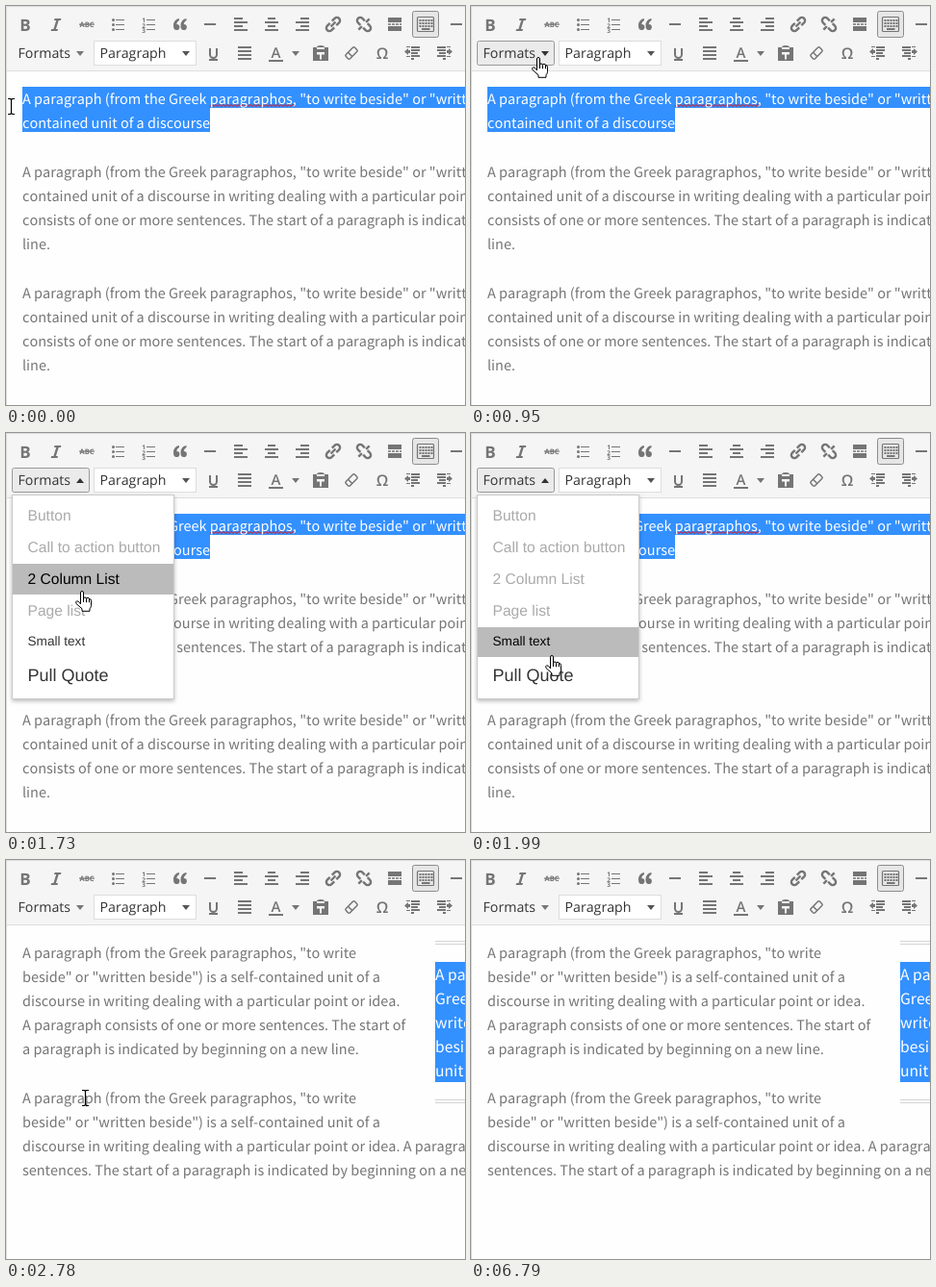
Recreate the animation shown at these times as an HTML page. Size 477 px wide and 415 px high, loop 7350 ms.

```html
<!DOCTYPE html>
<html lang="en">
<head>
<meta charset="utf-8">
<title>Editor formats menu</title>
<style>
html, body { margin: 0; width: 100%; height: 100%; overflow: hidden; background: #fefefe; }
svg { display: block; width: 477px; height: 415px; }
text { white-space: pre; text-rendering: geometricPrecision; font-kerning: none; }
.page { font: 14.47px "Noto Sans CJK JP", "Noto Sans CJK SC", "Noto Sans CJK", sans-serif; fill: #757575; font-kerning: none; }
.page .sel { fill: #fff; }
.quote { font-size: 15.7px; }
.ui { font: 14.2px "Open Sans", sans-serif; fill: #333; font-kerning: none; }
.menu { font-family: "Liberation Sans", Arial, sans-serif; }
.panel { filter: drop-shadow(0 2px 2px #0004); }
.icons { fill: #757575; font-family: "Open Sans", sans-serif; font-weight: 700; text-anchor: middle; }
.line { fill: none; stroke: #757575; stroke-width: 2; }
</style>
</head>
<body>
<svg viewBox="0 0 477 415">
  <rect width="477" height="415" fill="#fefefe"/>

  <g class="page" id="before">
    <path d="M17 84H477V106H212V131H17z" fill="#3390ff"/>
    <path id="squiggle" fill="none" stroke="#f00"/>
  </g>
  <g class="page" id="after">
    <path d="M446 84.5h31M446 87.5h31M446 249.5h31M446 252.5h31" stroke="#d4d4d4"/>
    <rect x="446" y="106" width="31" height="125" fill="#3390ff"/>
  </g>

  <rect width="477" height="67" fill="#f5f5f5"/>
  <path d="M0 .5H477M0 67.5H477M.5 0V415" stroke="#dedede"/>

  <g class="icons">
    <text x="20" y="25.500" font-size="17">B</text>
    <path d="M56.800 15h-2.100l-2.800 9h2.100l-.6 2h-6.800l.6-2h2.200l2.800-9h-2.200l.6-2h6.800z"/>
    <text x="84" y="22" font-size="7.5">ABC</text>
    <path d="M76 18.500h16v1.200H76z"/>
    <circle cx="111.500" cy="14.500" r="1.500"/>
    <circle cx="111.500" cy="19.500" r="1.500"/>
    <circle cx="111.500" cy="24.500" r="1.500"/>
    <text x="143" y="17" font-size="6.500">1</text>
    <text x="143" y="22.500" font-size="6.500">2</text>
    <text x="143" y="28" font-size="6.500">3</text>
    <path id="mark" d="M180 13q-6 1-6 7.500q0 4.500 3.200 4.500t3.200-3.100t-3.200-3q.5-2.900 2.800-4z"/>
    <use href="#mark" x="7.500"/>
    <path d="M397 12h14v5h-14zm0 9h14v5h-14z"/>
    <rect x="422.500" y="5.500" width="27" height="27" rx="2" fill="#e6e6e6" stroke="#8c8c8c"/>
    <text x="280.500" y="54" font-size="15" font-weight="600">A</text>
    <path d="M273 56h15v2h-15zM297 47h8l-4 5z"/>
    <path d="M319 43h4q0-2 4-2t4 2h4v14h-16z"/>
    <path d="M323 43h8v2h-8zM323 48h8v2.500h-3v5h-2v-5h-3z" fill="#f5f5f5"/>
    <text x="391" y="55" font-size="16" font-weight="600">Ω</text>
    <path id="outdent" d="M420 43v-1h-4v1zM430 44v-2h-9v2zM420 46h-2v-2l-4 3.500 4 3.500v-2h2zM430 47v-2h-9v2zM428 50v-2h-7v2zM430 53v-2h-9v2zM420 53v-1h-4v1zM424 56v-2h-3v2z"/>
    <use href="#outdent" transform="matrix(-1 0 0 1 878 0)"/>
  </g>
  <g class="line">
    <path d="M114 14.500h9m-9 5h9m-9 5h9M146 14.500h9m-9 5h9m-9 5h9" stroke-width="1.200"/>
    <path d="M206 19h12M462 19h12"/>
    <path d="M237 13h9m-9 4h14m-14 4h9m-9 4h14M272 13h8m-11 4h14m-11 4h8m-11 4h14M306 13h9m-14 4h14m-9 4h9m-14 4h14"/>
    <path d="M241 43h14m-14 4h14m-14 4h14m-14 4h14"/>
    <path d="M212 44v6.500a3.500 3.500 0 0 0 7 0V44M211 56h9"/>
    <path d="M397 19h14" stroke-dasharray="3 1" stroke-width="1.500"/>
    <rect x="427.500" y="11.500" width="17" height="15" rx="1" stroke-width="1.200"/>
    <path d="M429.500 15h14m-14 3h14m-14 3h14" stroke-dasharray="2 1"/>
    <path d="M432 24h8.500"/>
    <g transform="rotate(-45 340 19)" stroke-width="2.400">
      <path d="M338.500 15.800h-4a3.200 3.200 0 0 0 0 6.400h4M341.500 15.800h4a3.200 3.200 0 0 1 0 6.400h-4M336.500 19h7"/>
    </g>
    <g transform="rotate(45 372 19)" stroke-width="2.400">
      <path d="M370 15.800h-3.500a3.200 3.200 0 0 0 0 6.400h3.500M374 15.800h3.500a3.200 3.200 0 0 1 0 6.400h-3.500M372 11v5m0 6v5"/>
    </g>
    <g transform="rotate(-45 359 49)" stroke-width="1.500">
      <rect x="352.500" y="46" width="13" height="6" rx="1.500"/>
      <path d="M357 46v6"/>
    </g>
  </g>

  <g class="ui">
    <rect id="button" x="6.500" y="36.500" width="80" height="25" rx="2" stroke="#999"/>
    <text x="12.500" y="54">Formats</text>
    <path id="caret"/>
    <rect id="list" x="91.500" y="36.500" width="106" height="25" fill="#fff"/>
    <text x="97.500" y="54">Paragraph</text>
    <path d="M183 47h8l-4 5z" fill="#555"/>
  </g>

  <g class="menu" id="menu">
    <rect class="panel" x="6.500" y="64.500" width="168" height="212" fill="#fff" stroke="#ccc"/>
  </g>

  <g id="pointer">
    <path id="beam" d="M-3-7.500h2.500l1 1 1-1h2.500M.5-6.500V7.500M-3 8.500h2.500l1-1 1 1h2.500" fill="none" stroke="#000" stroke-width="1.200"/>
    <path id="arrow" d="M.5.5V16l3.600-3.400 2.500 6 2.400-1-2.500-5.800h5z" fill="#fff" stroke="#000"/>
    <path id="hand" transform="translate(-7)" d="M5.500 14V2q0-1.500 1.500-1.500t1.500 1.500V8q0-1 1.500-1t1.500 1.300q0-1 1.500-1t1.500 1.500q2-.5 2 1.500v5q0 2-1.500 3.500v2.500h-8v-2.500L1 13.500q-1-2 .5-2.700t4 3zM8.500 8v4M11.500 8.300v4M14.500 8.800v3.500" fill="#fff" stroke="#000"/>
  </g>
</svg>
<script>
const $ = id => document.getElementById(id);
const add = (parent, tag, attrs, content = '') => {
  const el = document.createElementNS('http://www.w3.org/2000/svg', tag);
  for (const key in attrs) el.setAttribute(key, attrs[key]);
  el.textContent = content;
  return parent.appendChild(el);
};
const write = (parent, x, y, lines, cls = '') =>
  lines.forEach((line, i) => add(parent, 'text', { x, y: y + i * 25, class: cls }, line));
const show = (el, on) => el.style.display = on ? '' : 'none';

const opening = 'A paragraph (from the Greek paragraphos, "to write';
const wide = [
  opening + ' beside" or "written beside") is a self-',
  'contained unit of a discourse in writing dealing with a particular point or idea.',
  'consists of one or more sentences. The start of a paragraph is indicated by',
  'line.'
];
const narrow = [opening, 'beside" or "written beside") is a self-contained unit of a'];
const third = 'discourse in writing dealing with a particular point or idea.';

write($('before'), 17, 102, [wide[0], 'contained unit of a discourse'], 'sel');
write($('before'), 17, 178, wide);
write($('before'), 17, 304, wide);
$('squiggle').setAttribute('d', 'M212 104.5' + 'l2-2 2 2'.repeat(22));

write($('after'), 17, 102, [...narrow, third,
  'A paragraph consists of one or more sentences. The start of',
  'a paragraph is indicated by beginning on a new line.']);
write($('after'), 17, 253, [...narrow, third + ' A paragraph consists of one or more',
  'sentences. The start of a paragraph is indicated by beginning on a new line.']);
write($('after'), 446, 125, ['A paragraph', 'Greek', 'write', 'beside', 'unit of'], 'sel quote');

// label, top, height, baseline, font size, colour
const items = [
  ['Button', 70, 33, 91, 15.6, '#aaa'],
  ['Call to action button', 103, 33, 124, 15.6, '#aaa'],
  ['2 Column List', 136, 32, 157, 15.6, '#aaa'],
  ['Page list', 169, 33, 190, 15.6, '#aaa'],
  ['Small text', 202, 31, 221, 13.6, '#333'],
  ['Pull Quote', 233, 37, 258, 18, '#333']
].map(([label, y, height, base, size, color]) => ({
  color,
  bar: add($('menu'), 'rect', { x: 7, y, width: 167, height, fill: '#bbb' }),
  text: add($('menu'), 'text', { x: 22.5, y: base, 'font-size': size }, label)
}));

const IDLE = 0, LIST = 1, HOVER = 2, PRESSED = 3, OPEN = 4, DONE = 5;
// time, pointer, x, y, state, hovered item
const steps = [
  [0, 'beam', 5, 104, IDLE],
  [250, 'beam', 42, 98, IDLE],
  [380, 'beam', 85, 86, IDLE],
  [500, 'arrow', 116, 57, IDLE],
  [650, 'hand', 92, 52, LIST],
  [810, 'hand', 70, 53, HOVER],
  [950, 'hand', 70, 53, PRESSED],
  [1210, 'hand', 70, 53, OPEN],
  [1600, 'hand', 77, 113, OPEN, 1],
  [1730, 'hand', 79, 164, OPEN, 2],
  [1870, 'hand', 82, 198, OPEN, 3],
  [1990, 'hand', 84, 231, OPEN, 4],
  [2140, 'hand', 83, 246, OPEN, 5],
  [2640, 'beam', 82, 247, OPEN, 5],
  [2780, 'beam', 82, 247, DONE],
  [6550, 'beam', 352, 329, DONE],
  [6670, 'beam', 442, 352, DONE],
  [6790, '', 0, 0, DONE]
];

function draw(now) {
  const t = now % 7350;
  const [, kind, x, y, state, hovered] = steps.findLast(step => step[0] <= t);
  const open = state === OPEN;
  const active = state >= HOVER && state <= OPEN;

  show($('before'), state !== DONE);
  show($('after'), state === DONE);
  show($('menu'), open);
  show($('button'), active);
  $('button').setAttribute('fill', state === HOVER ? '#fafafa' : '#ebebeb');
  $('caret').setAttribute('d', open ? 'M73 52h8l-4-5z' : 'M73 47h8l-4 5z');
  $('caret').setAttribute('fill', active ? '#333' : '#777');
  $('list').setAttribute('stroke', state === LIST ? '#999' : '#ddd');

  items.forEach((item, i) => {
    show(item.bar, i === hovered);
    item.text.setAttribute('fill', i === hovered ? '#000' : item.color);
  });

  for (const id of ['beam', 'arrow', 'hand']) show($(id), id === kind);
  $('pointer').setAttribute('transform', `translate(${x} ${y})`);
  requestAnimationFrame(draw);
}
requestAnimationFrame(draw);
</script>
</body>
</html>
```
